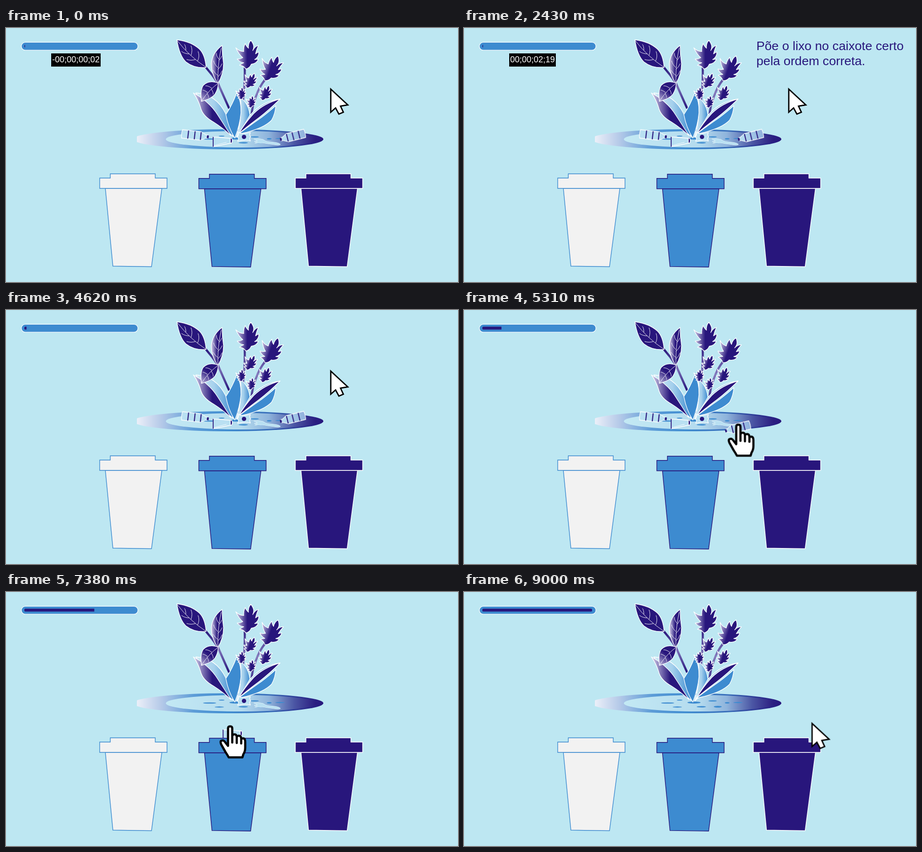
Recreate the animation shown at these times as an HTML page without scripts. Size 960x540 px, loop 9030 ms.

```html
<!DOCTYPE html>
<html lang="pt">
<head>
<meta charset="utf-8">
<title>Separar o lixo</title>
<style>
@property --f { syntax: "<integer>"; inherits: true; initial-value: 0 }
@property --s { syntax: "<integer>"; inherits: true; initial-value: 0 }

html, body { margin: 0; width: 100%; height: 100%; overflow: hidden; background: #bde7f2 }
body { position: relative; font-family: "Liberation Sans", Arial, sans-serif; color: #28167c }
svg { position: absolute; left: 0; top: 0; width: 960px; height: 540px }
p { position: absolute; margin: 0; white-space: pre; font-size: 26.67px; line-height: 32px }

/* instruction: letters come and go one by one */
.title { left: 621px; top: 21.8px }
.title i {
  font-style: normal; visibility: hidden;
  animation: on 9.03s calc(var(--i) * 32ms) infinite step-end,
             off 9.03s calc(var(--i) * 20ms) infinite step-end;
}
@keyframes on { 0% { visibility: visible } 40%, 100% { visibility: hidden } }
@keyframes off { 0% { opacity: 1 } 29.236%, 100% { opacity: 0 } }

.and { left: 34.5px; top: 54.5px; animation: and 9.03s infinite linear }
@keyframes and {
  0%, 37.2% { opacity: 0 }
  39%, 40.53% { opacity: 1 }
  50.5%, 100% { opacity: 0 }
}

/* timer */
.timer {
  position: absolute; left: 96px; top: 54px; height: 27.5px; padding: 0 2px;
  background: #000; color: #fff; font-size: 18px; line-height: 26px; white-space: nowrap;
  animation: fade 9.03s infinite linear, sec 9.03s infinite step-end, frame 9.03s infinite step-end;
}
.timer::after {
  counter-reset: s var(--s) f var(--f);
  content: "00;00;" counter(s, decimal-leading-zero) ";" counter(f, decimal-leading-zero);
}
.timer b { font-weight: 400; animation: minus 9.03s infinite step-end }
@keyframes minus { 0% { font-size: 18px } .66%, 100% { font-size: 0 } }
@keyframes fade { 0%, 40.53% { opacity: 1 } 50.5%, 100% { opacity: 0 } }
@keyframes sec {
  0% { --s: 0 } 10.625% { --s: 1 } 20.59% { --s: 2 } 30.56% { --s: 3 } 40.53%, 100% { --s: 0 }
}
@keyframes frame {
  0% { --f: 2 }
  .33% { --f: 1 }
  .66%, 10.625%, 20.59%, 30.56%, 40.53% { --f: 0; animation-timing-function: steps(30, jump-none) }
  10.624%, 20.589%, 30.559%, 40.529%, 50.49%, 100% { --f: 29 }
}

.bar { animation: bar 9.03s infinite linear }
@keyframes bar {
  0%, 50.5% { clip-path: inset(0 99.4% 0 0) }
  99.67%, 100% { clip-path: inset(0 0 0 0) }
}

/* pointer and dragged litter */
.pointer { animation: move 9.03s infinite linear }
@keyframes move {
  0%, 51.83% { transform: translate(689px, 128px) }
  57.14% { transform: translate(610px, 223px) }
  64.67% { transform: translate(487px, 314px) }
  67.33% { transform: translate(401px, 219px) }
  73.64% { transform: translate(485px, 339px) }
  78.63% { transform: translate(455px, 224px) }
  83.06% { transform: translate(485px, 311px) }
  86.16% { transform: translate(508px, 228px) }
  89.7% { transform: translate(487px, 328px) }
  93.69% { transform: translate(538px, 236px) }
  96.68% { transform: translate(686px, 322px) }
  98.67%, 100% { transform: translate(738.5px, 277.5px) }
}
.arrow { animation: arrow 9.03s infinite step-end }
.hand { animation: hand 9.03s infinite step-end }
@keyframes arrow { 0% { opacity: 1 } 57.14% { opacity: 0 } 96.68%, 100% { opacity: 1 } }
@keyframes hand { 0% { opacity: 0 } 57.14% { opacity: 1 } 96.68%, 100% { opacity: 0 } }

.item { animation: 9.03s infinite linear }
.b2 { animation-name: b2 }
.b1 { animation-name: b1 }
.tube { animation-name: tube }
.wrap { animation-name: wrap }
.fork { animation-name: fork }
@keyframes b2 {
  0%, 57.14% { transform: none; visibility: visible }
  64.67% { transform: translate(-123px, 91px); visibility: visible }
  64.68%, 100% { visibility: hidden }
}
@keyframes b1 {
  0%, 67.33% { transform: none; visibility: visible }
  73.64% { transform: translate(84px, 120px); visibility: visible }
  73.65%, 100% { visibility: hidden }
}
@keyframes tube {
  0%, 78.63% { transform: none; visibility: visible }
  83.06% { transform: translate(30px, 87px); visibility: visible }
  83.07%, 100% { visibility: hidden }
}
@keyframes wrap {
  0%, 86.16% { transform: none; visibility: visible }
  89.7% { transform: translate(-21px, 100px); visibility: visible }
  89.71%, 100% { visibility: hidden }
}
@keyframes fork {
  0%, 93.69% { transform: none; visibility: visible }
  96.68% { transform: translate(148px, 86px); visibility: visible }
  96.69%, 100% { visibility: hidden }
}

.line { stroke: #fff; stroke-width: 1.3; stroke-linejoin: round }
#lobed { vector-effect: non-scaling-stroke }
.vein { fill: none; stroke: #fff; stroke-width: .9; stroke-linecap: round }
.navy { fill: #28167c }
.blue { fill: #3d8bd0 }
</style>
</head>
<body>
<svg viewBox="0 0 960 540">
  <defs>
    <linearGradient id="pond">
      <stop offset="0" stop-color="#f4f5fb"/>
      <stop offset=".15" stop-color="#b4c9e8"/>
      <stop offset=".32" stop-color="#5c9cd7"/>
      <stop offset=".5" stop-color="#3d8bd0"/>
      <stop offset=".72" stop-color="#376cb9"/>
      <stop offset=".88" stop-color="#2e3492"/>
      <stop offset="1" stop-color="#28167c"/>
    </linearGradient>
    <linearGradient id="water">
      <stop offset="0" stop-color="#c3e9f4"/>
      <stop offset=".5" stop-color="#b4dbee"/>
      <stop offset=".68" stop-color="#8fb4dc"/>
      <stop offset=".85" stop-color="#4b56a4"/>
      <stop offset="1" stop-color="#29197e"/>
    </linearGradient>
    <linearGradient id="dusk">
      <stop offset="0" stop-color="#d5d2ec"/>
      <stop offset=".5" stop-color="#28167c"/>
    </linearGradient>
    <linearGradient id="shade" x1="0" y1="1" x2=".6" y2=".2">
      <stop offset="0" stop-color="#c1bce0"/>
      <stop offset=".7" stop-color="#28167c"/>
    </linearGradient>
    <linearGradient id="mist">
      <stop offset="0" stop-color="#d3edf6"/>
      <stop offset=".5" stop-color="#a5d0ec"/>
      <stop offset="1" stop-color="#3d8bd0"/>
    </linearGradient>
    <linearGradient id="glass">
      <stop offset="0" stop-color="#8fb0dc"/>
      <stop offset="1" stop-color="#b9e0f2"/>
    </linearGradient>
    <linearGradient id="stem" gradientUnits="userSpaceOnUse" x1="425" y1="85" x2="474" y2="170">
      <stop offset="0" stop-color="#28167c"/>
      <stop offset=".5" stop-color="#7a70b7"/>
      <stop offset="1" stop-color="#28167c"/>
    </linearGradient>
    <linearGradient id="stalk" gradientUnits="userSpaceOnUse" x1="0" y1="85" x2="0" y2="190">
      <stop offset="0" stop-color="#3a2a88"/>
      <stop offset=".5" stop-color="#857bbd"/>
      <stop offset="1" stop-color="#3a2a88"/>
    </linearGradient>
    <clipPath id="cut"><path d="M278 210H680V262H278Z"/></clipPath>
    <path id="lobed" d="M5-31C11-23 13-17 9-9Q14-18 21-20Q17-11 15-2Q19-5 22-6Q22 5 13 10Q18 10 21 9Q17 19 6 20Q2 29-6 30Q-9 24-19 22Q-15 19-10 17Q-20 15-24 9Q-17 9-12 6Q-20 0-27-15Q-19-7-10-7Q-11-16-7-24Q-4-17 0-14Q-1-24 5-31Z"/>
    <g id="bottle">
      <path class="line" d="M1 0H41Q47 3 52 5.5H55V12.5H52Q47 15 41 18H1Q-1 9 1 0Z"/>
      <path fill="none" stroke="#28167c" stroke-width="2.2" d="M14 .5V17.5M28 .5V17.5M41 .8V17.2"/>
      <path class="navy" d="M54 6H58V12H54Z"/>
    </g>
    <g id="bin">
      <path d="M211 341H331L309 507.5 227 506.3Z"/>
      <path d="M199 319H221.5V310H317V319H342V341H199Z"/>
    </g>
  </defs>

  <rect x="32.6" y="30.4" width="247.6" height="16.8" rx="8.4" class="blue line"/>
  <rect x="39" y="35.2" width="233" height="6.6" rx="2.5" class="navy bar"/>

  <g clip-path="url(#cut)">
    <ellipse cx="472" cy="236.5" rx="202" ry="21.3" fill="url(#pond)"/>
  </g>
  <ellipse cx="500" cy="236.5" rx="160.5" ry="17.5" fill="url(#water)"/>
  <g class="blue">
    <ellipse cx="432.5" cy="236" rx="14" ry="1.3"/>
    <ellipse cx="458" cy="229.7" rx="6" ry="1"/>
    <ellipse cx="453" cy="244.5" rx="10" ry="1.2"/>
    <ellipse cx="488.5" cy="235" rx="14" ry="2.2"/>
    <ellipse cx="528" cy="231.5" rx="9" ry="1.3"/>
    <ellipse cx="504" cy="244" rx="10" ry="1.5"/>
    <ellipse cx="539" cy="243.8" rx="8.5" ry="1.9"/>
    <ellipse cx="559" cy="235.6" rx="5" ry="1.6"/>
    <ellipse cx="582" cy="235" rx="10" ry="1.2"/>
  </g>

  <!-- plant -->
  <g fill="none" stroke-width="4.5">
    <path stroke="url(#stem)" d="M424 83Q438 99 450 117Q460 140 474 171"/>
    <path stroke="url(#stalk)" d="M507 84Q508 115 503 160M550 110Q538 125 531 145Q523 165 521 188"/>
  </g>
  <g class="line">
    <path fill="url(#mist)" d="M403 138Q446 140 467 183Q478 205 482 230Q440 195 403 138Z"/>
    <path fill="url(#mist)" d="M498 148Q515 160 518 185Q508 212 490 232Q502 190 498 148Z"/>
    <path fill="url(#mist)" d="M582 151Q543 156 517 187L492 230Q530 195 582 151Z"/>
    <path class="blue" d="M493 226Q520 206 543 190Q560 177 573 165Q572 182 564 196Q546 215 493 226Z"/>
    <path class="blue" d="M490 138Q500 156 499 180Q497 205 486 234Q472 212 467 184Q481 163 490 138Z"/>
    <path fill="url(#dusk)" d="M398 138Q432 157 449 184Q464 207 478 229Q460 212 441 200Q417 187 413 168Q408 152 398 138Z"/>
    <path class="navy" d="M582 151Q548 160 526 182Q506 204 495 224Q515 207 538 190Q560 173 582 151Z"/>
    <path class="navy" d="M363 25Q394 29 411 45Q423 57 425 84Q400 86 382 72Q368 58 363 25Z"/>
    <path fill="url(#dusk)" d="M459 37Q438 53 436 76Q436 98 450 118Q462 98 462 76Q459 57 459 37Z"/>
    <path fill="url(#shade)" d="M451 117Q431 110 419 122Q412 132 415 156Q437 150 444 140Q450 131 451 117Z"/>
  </g>
  <g class="vein">
    <path d="M364 27Q389 60 424 83M382 47Q382 38 379 35M393 58Q397 47 393 38M407 70Q412 60 408 50M389 55Q380 55 373 50M402 67Q393 70 384 67"/>
    <path d="M457 43Q449 78 450 116M452 66Q446 59 447 54M450 84Q443 78 441 70M450 101Q444 97 440 90M452 69Q457 65 458 60M450 88Q457 82 459 76M450 104Q457 98 459 91"/>
    <path d="M450 118Q433 130 416 154M437 128Q429 122 424 123M428 137Q421 132 418 132M436 130Q441 137 440 141M427 139Q431 145 430 148"/>
  </g>
  <g class="line" fill="url(#dusk)">
    <use href="#lobed" transform="translate(515 57)"/>
    <use href="#lobed" transform="translate(564 86) rotate(18) scale(.96)"/>
    <use href="#lobed" transform="translate(519.5 112) rotate(18) scale(.57)"/>
    <use href="#lobed" transform="translate(551 138) rotate(15) scale(.57)"/>
    <use href="#lobed" transform="translate(500 139) rotate(-5) scale(.43)"/>
    <use href="#lobed" transform="translate(521 157) scale(.43)"/>
  </g>

  <!-- litter -->
  <g class="item fork">
    <path fill="#b9e0f2" stroke="#d9f0f8" d="M526 236L535 235 546 237Q550 240 555 241.5L569 243Q580 244 583 247.5Q580 250 570 248L553 245.5Q547 243.5 542 245L528 244.5 534 242 527 241 534 239Z"/>
  </g>
  <g class="item b2"><use href="#bottle" fill="url(#glass)" transform="translate(637.5 232.5) rotate(166) scale(.95 1)"/></g>
  <g class="item b1"><use href="#bottle" fill="#b9e0f2" transform="translate(374 216) rotate(6.5)"/></g>
  <g class="item tube">
    <path class="line" fill="#b9e0f2" d="M440 231.5L477 234.5V245L440 252.5Z"/>
    <path class="vein" d="M442 250L468 243"/>
    <path fill="none" stroke="#28167c" stroke-width="1.8" d="M440 231.5V252.5"/>
    <path class="navy line" d="M476.5 234.5H479.5Q482 239.5 479.5 244.5H476.5Z"/>
  </g>
  <g class="item wrap">
    <path class="line" fill="#b9e0f2" d="M493 222Q498 225 505 224Q513 224 519 222L517.5 227 519.5 231 517.5 235 519 240.5Q512 238 505 239Q498 239 492 241L494 236 492 231 494 227Z"/>
    <circle class="navy" cx="505.5" cy="231.5" r="4.6"/>
  </g>

  <!-- bins -->
  <g stroke-width="1.4">
    <use href="#bin" fill="#f2f2f2" stroke="#3d8bd0"/>
    <use href="#bin" x="210.5" y=".8" fill="#3d8bd0" stroke="#28167c"/>
    <use href="#bin" x="415.5" fill="#28167c" stroke="#fff"/>
  </g>

  <g class="pointer" fill="#fff" stroke="#000">
    <path class="arrow" stroke-width="2.8" d="M.8 2V51L11 42 18 55 27.5 51 21.5 38 37 35.5Z"/>
    <path class="hand" stroke-width="4.6" stroke-linejoin="round" stroke-linecap="round" d="M-4.500 42V5Q-4.500 .5 0 .5Q4.500 .5 4.500 5V35V22Q5 17.500 9 17.500Q14 17.500 14 24V36V25Q14 20 19 20.500Q23.500 21 23.500 27V37V30Q24 25.500 28 26Q32 27 32 33V46Q32 54 28 60L26 66.500H-3Q-6 61-10 55L-19 39Q-22 32-18 31Q-14 29-10 35Z"/>
  </g>
</svg>

<p class="title"><i style="--i:1">P</i><i style="--i:2">õ</i><i style="--i:3">e</i> <i style="--i:5">o</i> <i style="--i:7">l</i><i style="--i:8">i</i><i style="--i:9">x</i><i style="--i:10">o</i> <i style="--i:12">n</i><i style="--i:13">o</i> <i style="--i:15">c</i><i style="--i:16">a</i><i style="--i:17">i</i><i style="--i:18">x</i><i style="--i:19">o</i><i style="--i:20">t</i><i style="--i:21">e</i> <i style="--i:23">c</i><i style="--i:24">e</i><i style="--i:25">r</i><i style="--i:26">t</i><i style="--i:27">o</i>
<i style="--i:28">p</i><i style="--i:29">e</i><i style="--i:30">l</i><i style="--i:31">a</i> <i style="--i:33">o</i><i style="--i:34">r</i><i style="--i:35">d</i><i style="--i:36">e</i><i style="--i:37">m</i> <i style="--i:39">c</i><i style="--i:40">o</i><i style="--i:41">r</i><i style="--i:42">r</i><i style="--i:43">e</i><i style="--i:44">t</i><i style="--i:45">a</i><i style="--i:46">.</i></p>
<p class="and">and..</p>
<div class="timer"><b>-</b></div>
</body>
</html>
```
